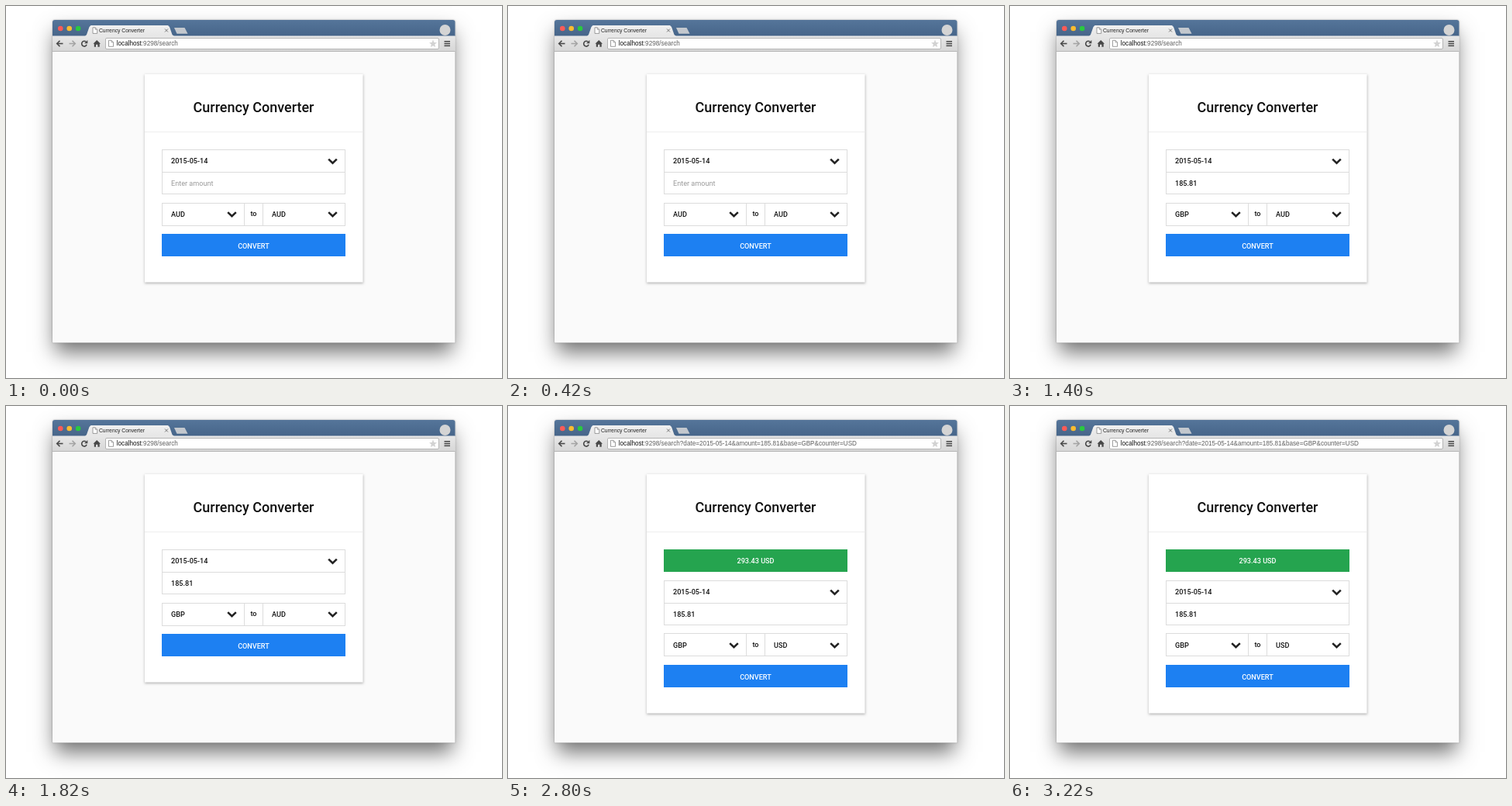
Recreate the animation shown at these times as an HTML page with a canvas. Size 640 by 480 pixels, loop 3.5 s.

```html
<!DOCTYPE html>
<html lang="en">
<head>
<meta charset="utf-8">
<title>Currency Converter</title>
<style>
  html, body { margin: 0; width: 100%; height: 100%; overflow: hidden; background: #fff; }
  canvas { display: block; width: 640px; height: 480px; }
</style>
</head>
<body>
<canvas id="stage" width="640" height="480"></canvas>
<script>
const ctx = document.getElementById('stage').getContext('2d');
const STEP = 700;
const UI = 'Roboto, sans-serif';
const CHROME = '"Liberation Sans", Arial, sans-serif';

const steps = [
  { base: 'AUD', counter: 'AUD' },
  { amount: '185.81', lift: 1, base: 'AUD', counter: 'AUD' },
  { amount: '185.81', base: 'GBP', counter: 'AUD' },
  { amount: '185.81', base: 'GBP', counter: 'USD' },
  { amount: '185.81', base: 'GBP', counter: 'USD', result: '293.43 USD',
    query: '?date=2015-05-14&amount=185.81&base=GBP&counter=USD' }
];

function rect(x, y, w, h, fill) {
  ctx.fillStyle = fill;
  ctx.fillRect(x, y, w, h);
}

function frame(x, y, w, h, color, fill = '#fff') {
  rect(x, y, w, h, fill);
  ctx.strokeStyle = color;
  ctx.lineWidth = 1;
  ctx.strokeRect(x + 0.5, y + 0.5, w - 1, h - 1);
}

function path(points, closed) {
  ctx.beginPath();
  points.forEach(([x, y]) => ctx.lineTo(x, y));
  if (closed) ctx.closePath();
}

function shape(points, fill) {
  path(points, true);
  ctx.fillStyle = fill;
  ctx.fill();
}

function line(points, color, width) {
  path(points);
  ctx.strokeStyle = color;
  ctx.lineWidth = width;
  ctx.stroke();
}

function dot(x, y, r, fill) {
  ctx.beginPath();
  ctx.arc(x, y, r, 0, Math.PI * 2);
  ctx.fillStyle = fill;
  ctx.fill();
}

function text(str, x, y, font, color, align = 'left') {
  ctx.font = font;
  ctx.fillStyle = color;
  ctx.textAlign = align;
  ctx.fillText(str, x, y);
}

function label(str, x, y, color = '#111', align = 'left', weight = 500) {
  text(str, x, y, `${weight} 9.1px ${UI}`, color, align);
}

function vertical(y0, y1, top, bottom) {
  const g = ctx.createLinearGradient(0, y0, 0, y1);
  g.addColorStop(0, top);
  g.addColorStop(1, bottom);
  return g;
}

function withShadow(color, blur, offset, draw) {
  ctx.save();
  ctx.shadowColor = color;
  ctx.shadowBlur = blur;
  ctx.shadowOffsetY = offset;
  draw();
  ctx.restore();
}

function chevron(x, y) {
  line([[x - 5.3, y - 2.4], [x, y + 2.6], [x + 5.3, y - 2.4]], '#222', 2.6);
}

function pageIcon(x, y, w, h) {
  path([[x, y], [x + w - 2.5, y], [x + w, y + 2.5], [x + w, y + h], [x, y + h]], true);
  ctx.fillStyle = '#fff';
  ctx.fill();
  ctx.strokeStyle = '#858585';
  ctx.lineWidth = 0.8;
  ctx.stroke();
  line([[x + w - 2.5, y], [x + w - 2.5, y + 2.5], [x + w, y + 2.5]], '#858585', 0.7);
}

function arrow(x, y, dir, color) {
  line([[x - 4 * dir, y], [x + 3.5 * dir, y]], color, 1.6);
  line([[x, y - 3.8], [x + 3.8 * dir, y], [x, y + 3.8]], color, 1.6);
}

function star(x, y, r) {
  const points = Array.from({ length: 10 }, (_, i) => {
    const a = i * Math.PI / 5 - Math.PI / 2;
    const d = i % 2 ? r * 0.45 : r;
    return [x + d * Math.cos(a), y + d * Math.sin(a)];
  });
  shape(points, '#d2d2d2');
}

function drawWindow() {
  withShadow('rgba(0,0,0,0.55)', 25, 13, () => rect(63, 21, 513, 413, '#777'));
  withShadow('rgba(0,0,0,0.35)', 2, 0, () => {
    ctx.beginPath();
    ctx.roundRect(60, 18, 519.5, 416.5, [3, 3, 1, 1]);
    ctx.fillStyle = '#fafafa';
    ctx.fill();
  });
  ctx.beginPath();
  ctx.roundRect(60, 18, 519.5, 21, [3, 3, 0, 0]);
  ctx.fillStyle = vertical(18, 39, '#55759a', '#466589');
  ctx.fill();
  ['#fc5b57', '#fdbc2e', '#2ac940'].forEach((c, i) => dot(70.3 + i * 11.4, 29, 3.3, c));

  shape([[102, 39], [104, 37], [107.5, 27], [109.5, 25], [209, 25], [211, 27], [214.5, 37], [217, 39]],
    vertical(25, 39, '#f0f0f0', '#e6e6e6'));
  shape([[217, 28], [230.5, 28], [234.5, 35.7], [220.5, 35.7]], '#c3c8ce');
  pageIcon(112, 27.8, 5.7, 7.6);
  text('Currency Converter', 120, 34.2, `6.75px ${CHROME}`, '#222');
  line([[205, 29.5], [209, 33.5]], '#777', 1);
  line([[209, 29.5], [205, 33.5]], '#777', 1);
  dot(566.5, 31, 7, '#d4d4d4');
}

function drawToolbar(query = '') {
  rect(60, 38.5, 519.5, 20, vertical(38, 59, '#e8e8e8', '#d6d6d6'));
  rect(60, 58, 519.5, 1, '#b5b5b5');
  arrow(69.5, 48.5, -1, '#484848');
  arrow(85.5, 48.5, 1, '#a4a4a4');

  ctx.beginPath();
  ctx.arc(101, 48.7, 3.3, 0.35, Math.PI * 1.72);
  ctx.strokeStyle = '#484848';
  ctx.lineWidth = 1.6;
  ctx.stroke();
  shape([[105.3, 44], [105.3, 48.2], [101.2, 48.2]], '#484848');

  shape([[112.5, 48.8], [117.2, 44], [122, 48.8], [120.7, 48.8], [120.7, 52.8],
    [118.4, 52.8], [118.4, 49.8], [116, 49.8], [116, 52.8], [113.8, 52.8], [113.8, 48.8]], '#484848');

  ctx.beginPath();
  ctx.roundRect(128.5, 41.5, 430, 14, 1.5);
  ctx.fillStyle = '#fff';
  ctx.fill();
  ctx.strokeStyle = '#b4b4b4';
  ctx.lineWidth = 1;
  ctx.stroke();
  pageIcon(132.5, 44.3, 6, 8);

  const font = `8.13px ${CHROME}`;
  text('localhost', 142.8, 51.3, font, '#111');
  const hostWidth = ctx.measureText('localhost').width;
  text(':9298/search' + query, 142.8 + hostWidth, 51.3, font, '#606060');
  star(551, 48.8, 5.2);
  for (let i = 0; i < 3; i++) rect(565.5, 45 + i * 2.8, 7.5, 1.5, '#484848');
}

function drawForm({ amount, lift = 0, base, counter, result }) {
  const dy = result ? 40 : 0;
  const rowY = 254 + (result ? 39 : 0);
  const border = '#dcdcdc';

  withShadow('rgba(0,0,0,0.28)', 3, 1.3, () => rect(179, 88, 281.5, 268.5 + dy, '#fff'));
  text('Currency Converter', 319.5, 137, `500 18px ${UI}`, '#111', 'center');
  rect(179, 162, 281.5, 1, '#eee');

  if (result) {
    rect(201, 185, 237, 29, '#25a44f');
    label(result, 319.5, 202.5, '#fff', 'center');
  }

  frame(201, 185 + dy, 237, 30, border);
  label('2015-05-14', 213, 203 + dy);
  chevron(421.5, 200 + dy);
  frame(201, 214 + dy, 237, 29, border);
  if (amount) label(amount, 213, 232 - lift + dy);
  else label('Enter amount', 213, 232.3, '#999', 'left', 400);

  frame(201, rowY, 237, 30, border);
  rect(307, rowY, 1, 30, border);
  rect(331, rowY, 1, 30, border);
  label(base, 213, 271.5 + dy);
  label('to', 319.5, 271.3 + dy, '#111', 'center');
  label(counter, 343, 271.5 + dy);
  chevron(291.5, 268.5 + dy);
  chevron(421.5, 268.5 + dy);

  rect(201, 294 + dy, 237, 29, '#1d80f2');
  label('CONVERT', 319.5, 312.5 + dy, '#fff', 'center');
}

function draw(time) {
  const state = steps[Math.floor(time / STEP) % steps.length];
  rect(0, 0, 640, 480, '#fff');
  drawWindow();
  drawToolbar(state.query);
  drawForm(state);
}

function tick() {
  draw(performance.now() - start);
  requestAnimationFrame(tick);
}

const start = performance.now();
tick();
</script>
</body>
</html>
```
